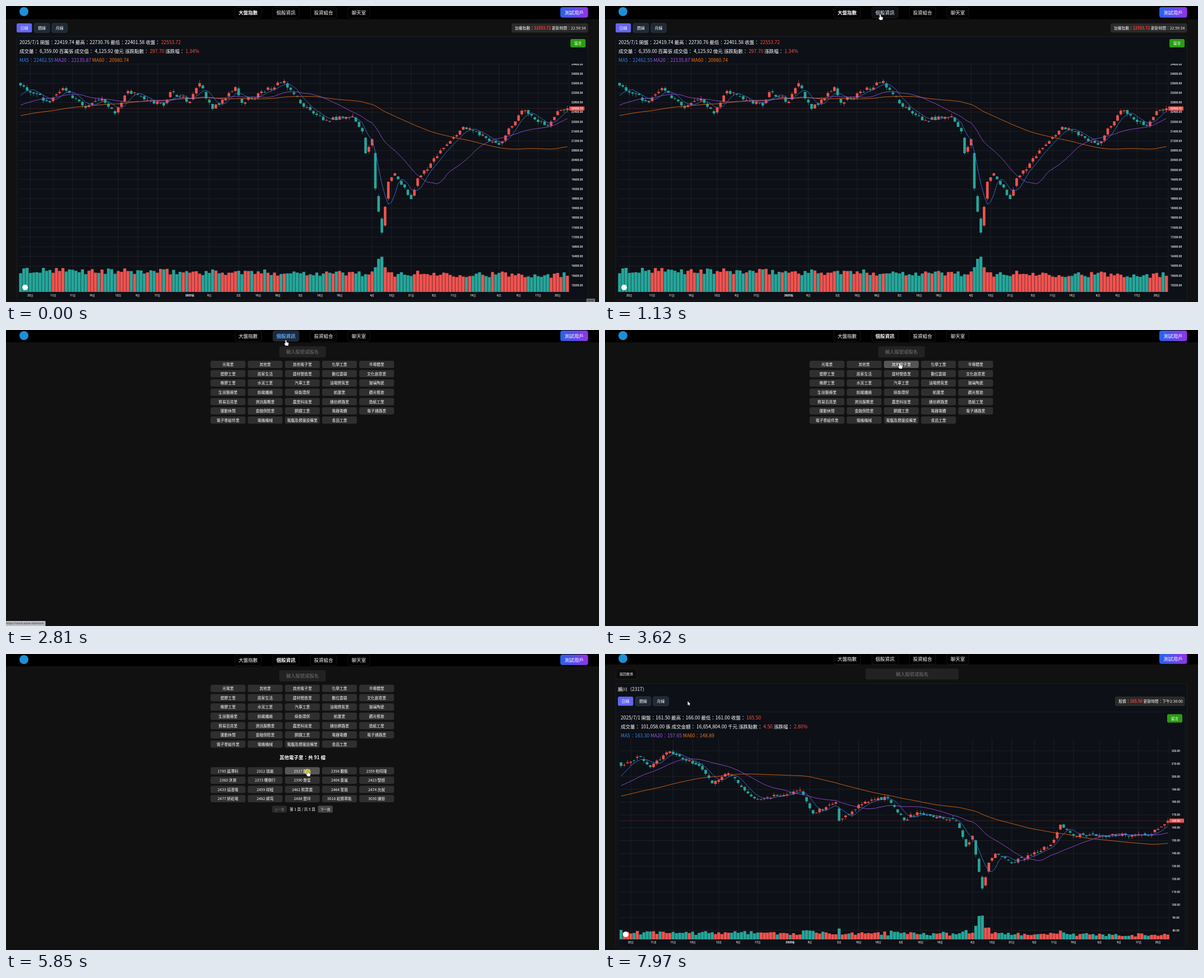
Animation, 1058 px wide and 529 px high, one loop 8000 ms. Source, as an HTML page with a canvas:

```html
<!DOCTYPE html>
<html lang="zh-Hant">
<head>
<meta charset="utf-8">
<style>
html, body { margin: 0; width: 100%; height: 100%; overflow: hidden; background: #111; }
canvas { display: block; }
</style>
</head>
<body>
<canvas id="stage" width="1058" height="529"></canvas>
<script>
const c = document.getElementById('stage').getContext('2d');
const CJK = '"Noto Sans CJK TC","Noto Sans CJK JP","Noto Sans CJK SC","Noto Sans CJK",sans-serif';
const LATIN = 'Roboto,"Noto Sans CJK TC","Noto Sans CJK JP",sans-serif';
const RED = '#ef5350', GREEN = '#26a69a', BLUE = '#3b82f6', PURPLE = '#a855f7', ORANGE = '#f97316';
const BARS = 169, STEP = 5.807, LOOP = 8000;
const rnd = n => { const v = Math.sin(n * 12.9898 + 4.1) * 43758.5453; return v - Math.floor(v); };

// ---------- drawing helpers ----------
function box(x, y, w, h, fill, r = 0, stroke) {
  c.beginPath();
  c.roundRect(x, y, w, h, r);
  if (fill) { c.fillStyle = fill; c.fill(); }
  if (stroke) { c.strokeStyle = stroke; c.lineWidth = .7; c.stroke(); }
}
function disc(x, y, r, fill) {
  c.beginPath();
  c.arc(x, y, r, 0, 7);
  c.fillStyle = fill;
  c.fill();
}
function text(s, x, y, size, color = '#fff', align = 'left', weight = 400, font = CJK) {
  c.font = `${weight} ${size}px ${font}`;
  c.textAlign = align;
  c.fillStyle = color;
  c.fillText(s, x, y + size * .37);
}
const axisText = (s, x, y, weight = 500) => text(s, x, y, 4.8, '#fff', 'center', weight, LATIN);
function runs(parts, x, y, size, weight = 400) {
  for (const [s, color, w = weight] of parts) {
    text(s, x, y, size, color, 'left', w);
    x += c.measureText(s).width;
  }
}
function line(x1, y1, x2, y2, color, dash = []) {
  c.setLineDash(dash);
  c.strokeStyle = color;
  c.lineWidth = .6;
  c.beginPath();
  c.moveTo(x1, y1);
  c.lineTo(x2, y2);
  c.stroke();
  c.setLineDash([]);
}

// ---------- charts: a price path through turning points, the rest derived ----------
// labels start at a bar and repeat every six bars
const dates = {
  3: '22日', 10: '11月 11日 19日', 30: '12月 9日 17日', 52: '2025年 9日', 67: '2月 10日 18日',
  86: '3月 10日 18日', 108: '4月 13日 21日', 127: '5月 11日 19日', 147: '6月 9日 17日 25日'
};
const indexChart = {
  x0: 26, left: 23, right: 1005, top: 104, bottom: 511, dateY: 517, labelX: 1019, mark: [34, 503],
  max: 24400, tick: 400, rows: 24, maxY: 103.8, gap: 17.18, last: 22553.72,
  seed: 0, jitter: 8, volume: 38, fade: .045, spread: 11, react: 0, crash: 32,
  turns: [[0, 142], [9, 172], [13, 147], [20, 182], [25, 166], [29, 192], [33, 152], [44, 178], [46, 154], [52, 171],
    [55, 138], [59, 184], [66, 145], [68, 173], [81, 134], [87, 180], [94, 204], [102, 197], [105, 224], [106, 263],
    [108, 238], [109, 326], [111, 405], [113, 314], [115, 299], [120, 345], [122, 308], [136, 216], [147, 248],
    [154, 187], [162, 214], [165, 188], [168, 183]]
};
const stockChart = {
  x0: 28.6, left: 26, right: 1007, top: 152, bottom: 510, dateY: 515, labelX: 1018.5, mark: [37, 501],
  max: 220, tick: 10, rows: 15, maxY: 173, gap: 22.93, last: 165.5,
  seed: 300, jitter: 6, volume: 11, fade: .02, spread: 6, react: .35, crash: 28,
  turns: [[0, 200], [6, 184], [9, 202], [15, 174], [24, 200], [28, 231], [33, 213], [41, 258], [50, 252], [55, 243],
    [59, 285], [66, 265], [67, 298], [75, 264], [82, 257], [87, 297], [91, 283], [103, 298], [106, 344], [108, 325],
    [111, 419], [113, 373], [115, 357], [120, 374], [132, 341], [135, 305], [139, 324], [162, 324], [168, 298]]
};
function prepare(ch) {
  const { turns, seed } = ch;
  ch.bars = Array.from({ length: BARS }, (_, i) => {
    const k = Math.max(1, turns.findIndex(p => p[0] >= i));
    const [[a, ya], [b, yb]] = [turns[k - 1], turns[k]];
    const noise = i === a || i === b ? 0 : ch.jitter * (rnd(i + seed) - .5);
    return { close: ya + (yb - ya) * (i - a) / (b - a) + noise };
  });
  // prices before the first bar fall away along a power curve
  const closeAt = i => i < 0 ? turns[0][1] + 17 * (-i) ** .36 : ch.bars[i].close;
  const average = (i, n) => {
    let sum = 0;
    for (let j = 0; j < n; j++) sum += closeAt(i - j);
    return sum / n;
  };
  ch.bars.forEach((bar, i) => {
    const change = closeAt(i - 1) - bar.close;
    bar.x = ch.x0 + STEP * i;
    bar.open = bar.close + (i ? change * .7 : -6) + (rnd(i + seed + 9) - .5) * 5;
    bar.volume = ch.volume - ch.fade * i + ch.spread * (rnd(i + seed + 50) - .5) +
      ch.react * Math.abs(change) + ch.crash * Math.exp(-(((i - 110.5) / 1.2) ** 2));
    for (const n of [5, 20, 60]) bar['ma' + n] = average(i, n);
  });
}
prepare(indexChart);
prepare(stockChart);

function drawAverage(bars, key, color) {
  c.strokeStyle = color;
  c.lineWidth = .8;
  c.beginPath();
  for (const bar of bars) c.lineTo(bar.x, bar[key]);
  c.stroke();
}
function drawChart(ch, cross) {
  const { left, right, top, bottom, bars } = ch;
  c.save();
  c.beginPath();
  c.rect(left - 3, top - 1, 1036 - left, 430);
  c.clip();
  for (let k = 0; k < ch.rows; k++) {
    const y = ch.maxY + k * ch.gap;
    line(left, y, right, y, '#292c32');
    axisText((ch.max - k * ch.tick).toFixed(2), ch.labelX, y);
  }
  for (const start in dates) dates[start].split(' ').forEach((label, k) => {
    const { x } = bars[+start + k * 6];
    line(x, top, x, bottom, '#292c32');
    axisText(label, x, ch.dateY, label.length > 4 ? 800 : 500);
  });
  line(right, top, right, bottom, '#1f2329');
  bars.forEach(({ x, open, close, volume }, i) => {
    const hi = Math.min(open, close), lo = Math.max(open, close), wick = 5 * rnd(i + 70);
    c.fillStyle = close <= open ? RED : GREEN;
    c.fillRect(x - 2.6, bottom - volume, 5.3, volume);
    c.fillRect(x - .35, hi - wick, .7, lo - hi + wick + 5 * rnd(i + 90));
    c.fillRect(x - 2.3, hi, 4.6, Math.max(1, lo - hi));
  });
  drawAverage(bars, 'ma60', ORANGE);
  drawAverage(bars, 'ma20', PURPLE);
  drawAverage(bars, 'ma5', BLUE);
  const lastY = ch.maxY + (ch.max - ch.last) / ch.tick * ch.gap;
  line(left, lastY, right, lastY, 'rgba(239,83,80,.75)', [.8, .8]);
  box(right, lastY - 3.6, 27, 7.2, RED, .5);
  axisText(ch.last.toFixed(2), ch.labelX, lastY);
  disc(...ch.mark, 5, '#fff');
  if (cross && cross.y > top && cross.y < bottom && cross.x < right) {
    const i = Math.round((cross.x - ch.x0) / STEP), { x } = bars[i];
    const day = new Date(2025, 6, 1 - Math.round((BARS - 1 - i) * 1.52));
    line(left, cross.y, right, cross.y, '#9598a1', [2, 2]);
    line(x, top, x, bottom, '#9598a1', [2, 2]);
    box(right, cross.y - 3.6, 25, 7.2, '#4c525e');
    axisText((ch.max - (cross.y - ch.maxY) / ch.gap * ch.tick).toFixed(2), ch.labelX, cross.y);
    box(x - 15, bottom + .5, 30, 10, '#4c525e');
    axisText(`${day.getDate()} ${day.getMonth() + 1}月 '${day.getFullYear() % 100}`, x, ch.dateY);
  }
  c.restore();
}

// ---------- pointer ----------
// start, end, steps, target; each move begins where the previous one stopped
const moves = [
  [460, 1130, 11, 491, 15],
  [1200, 1201, 1, 498.5, 16.5],
  [2810, 3360, 9, 526, 58],
  [3620, 3690, 2, 526, 60],
  [4830, 5450, 10, 538.5, 208.5],
  [6670, 7420, 12, 528.5, 107],
  [7620, 7970, 6, 147.5, 84.5]
];
const clicks = [1270, 4230, 5850];
function pointer(t) {
  if (t < moves[0][0]) return { x: -99, y: -99 };
  let x = 780, y = 420, moving = false;
  for (const [t0, t1, n, tx, ty] of moves) {
    if (t < t0) break;
    const k = Math.min(n, Math.floor((t - t0) / (t1 - t0) * (n - 1) + 1.01)) / n;
    const e = k * k * (3 - 2 * k);
    x += (tx - x) * e;
    y += (ty - y) * e;
    moving = t < t1 + 70;
  }
  return { x, y, moving };
}
const arrow = new Path2D('M0 0V7L1.6 5.6L2.7 8L3.9 7.5L2.9 5.2L5 5Z');
const hand = new Path2D('M-1 .8Q0-.8 1 .8V4L4 4.8Q5 5.2 4.8 6.5L4 10H-.6L-3 6.6Q-2.8 5.2-1 6.2Z');
let mouse, overButton;
function hover(x, y, w, h) {
  const hit = mouse.x >= x && mouse.x <= x + w && mouse.y >= y && mouse.y <= y + h;
  overButton ||= hit;
  return hit;
}
function drawPointer(t) {
  if (clicks.some(s => t >= s && t < s + 70)) disc(mouse.x - .3, mouse.y + 2, 5.2, 'rgba(232,214,30,.85)');
  c.save();
  c.translate(mouse.x, mouse.y);
  const shape = overButton ? hand : arrow;
  c.lineWidth = 1;
  c.strokeStyle = '#000';
  c.stroke(shape);
  c.fillStyle = '#fff';
  c.fill(shape);
  c.restore();
}

// ---------- pages ----------
const nav = [[408.5, 47, '大盤指數'], [476, 47, '個股資訊'], [543, 47, '投資組合'], [610, 39, '聊天室']];
function header(page) {
  const dy = [0, -1, -3][page];
  box(0, 0, 1058, [23.5, 22, 18.5][page], '#000');
  disc(32, page < 2 ? 10 : 8, 8, '#1d8fd6');
  nav.forEach(([x, w, label], i) => {
    const over = hover(x, 2 + dy, w, 20), active = i === page && page < 2;
    box(x, 2 + dy, w, 19.5, over ? (page ? '#1f2937' : '#0b0f14') : '#000', 4, '#20242b');
    text(label, x + w / 2, 12 + dy, 8.5, over && page ? '#60a5fa' : '#fff', 'center', active ? 700 : 400);
  });
  const g = c.createLinearGradient(989, 0, 1038, 0);
  g.addColorStop(0, '#2563eb');
  g.addColorStop(1, '#9333ea');
  box(989, 2 + dy, 49.5, 18.7, g, 4);
  text('測試用戶', 1013.8, 12 + dy, 8.5, '#fff', 'center', 500);
}
function periodTabs(x, y) {
  ['日線', '週線', '月線'].forEach((label, i) => {
    const bx = x + i * 31.5;
    hover(bx, y, 27.3, 16.3);
    box(bx, y, 27.3, 16.3, i ? '#1f2937' : '#6366f1', 2.5, i ? '#374151' : undefined);
    text(label, bx + 13.6, y + 8.2, 7, '#fff', 'center', 500);
  });
}
function legend(x, y, rows) {
  rows.forEach((row, i) => runs(row, x, y + i * 15.8, 8.5));
}
function averages(a, b, d) {
  return [[`MA5：${a} `, BLUE], [`MA20：${b} `, PURPLE], [`MA60：${d}`, ORANGE]];
}
function commentButton(x, y) {
  box(x, y, 27, 15, '#2a9d12', 2.5);
  text('留言', x + 13.5, y + 7.6, 6.8, '#fff', 'center');
}
function searchBox(x, y, w, h) {
  box(x, y, w, h, '#222', 3);
  text('輸入股號或股名', x + w / 2, y + h / 2, 8.3, '#737373', 'center');
}

function indexPage() {
  periodTabs(19, 31);
  box(902, 31, 136.5, 16.5, '#2a2a2a', 3);
  runs([['加權指數：', '#fff'], ['22553.72', '#ff4136', 700], [' 更新時間：22:59:34', '#fff']], 908, 39.3, 6.8, 500);
  box(19.5, 54.5, 1019, 471, '#0d1016', 4, '#20242c');
  legend(24, 65.3, [
    [['2025/7/1 開盤：22419.74 最高：22730.76 最低：22401.58 收盤： ', '#fff'], ['22553.72', '#ff5340']],
    [['成交量： 6,359.00 百萬張 成交值： 4,125.92 億元 漲跌點數： ', '#fff'], ['297.70', '#ff5340'],
      [' 漲跌幅： ', '#fff'], ['1.34%', '#ff5340']],
    averages('22462.55', '22135.87', '20980.74')]);
  commentButton(1007, 59);
  drawChart(indexChart, mouse.moving && mouse);
}

const industries = ('光電業 其他業 其他電子業 化學工業 半導體業 塑膠工業 居家生活 建材營造業 數位雲端 文化創意業 ' +
  '橡膠工業 水泥工業 汽車工業 油電燃氣業 玻璃陶瓷 生技醫療業 紡織纖維 綠能環保 航運業 觀光餐旅 ' +
  '貿易百貨業 資訊服務業 農業科技業 通信網路業 造紙工業 運動休閒 金融保險業 鋼鐵工業 電器電纜 電子通路業 ' +
  '電子零組件業 電機機械 電腦及週邊設備業 食品工業').split(' ');
const stocks = ('1785 晨澤科,2312 瑞崙,2317 鵬川,2354 鵬衡,2359 柏特隆,2360 沐棠,2373 曙嶺行,2390 霽星,2404 秦嵐,2423 堅經,' +
  '2433 協澄電,2459 祥睦,2461 熙眾霆,2464 誓築,2474 允就,2477 妍崧電,2482 綿穹,2488 楚坪,3018 崧鐫翠能,3030 謙矩').split(',');
function buttonGrid(labels, top) {
  labels.forEach((label, i) => {
    const x = 365 + i % 5 * 66.3, y = top + Math.floor(i / 5) * 16.6;
    box(x, y, 62.2, 13, hover(x, y, 62.2, 13) ? '#555' : '#2f2f2f', 3);
    text(label, x + 31.1, y + 6.7, 6.8, '#fff', 'center');
  });
}
function searchPage(t) {
  searchBox(487.5, 29, 83, 20);
  if (t >= 1940) buttonGrid(industries, 55);
  if (t >= 4500) {
    text('其他電子業：共 91 檔', 529, 185, 8.5, '#fff', 'center', 700);
    buttonGrid(stocks, 202.3);
    box(474.5, 271, 26.5, 12.5, '#292929', 2.5);
    text('上一頁', 487.8, 277.4, 5.7, '#8a8a8a', 'center');
    text('第 1 頁 / 共 5 頁', 529, 277.2, 6.7, '#fff', 'center', 500);
    box(556.5, 271, 26.5, 12.5, '#444', 2.5);
    text('下一頁', 569.8, 277.4, 5.7, '#fff', 'center');
  }
}

function loadingNote(t) {
  c.save();
  c.globalAlpha = .8 + .2 * Math.cos((t - 6060) / 1000 * Math.PI);
  text('散財中...', 517, 313.5, 10, '#facc15', 'left', 500);
  box(504.5, 314.5, 3.5, 1.4, '#eee', .7);
  box(510, 309.5, 3.5, 1.4, '#eee', .7);
  c.translate(508.8, 313.5);
  c.rotate(.75);
  box(-4.5, -2.7, 9, 5.4, '#d5d0a4', .6);
  box(-1.2, -2.7, 2.4, 5.4, '#6f7a4a');
  c.restore();
}
function stockPage(t) {
  const loaded = t >= 6740, infoX = loaded ? 910 : 913.5;
  box(19.5, 26, 37.5, 19, '#0c0c0c', 3, '#262626');
  text('返回搜尋', 38, 35.7, 6, '#fff', 'center', 500);
  searchBox(465, 26, 166, 19.5);
  box(19.5, 52.8, 1019, 475.5, '#0d1016', 4, '#20242c');
  text('鵬川（2317）', 23, 62.5, 8.4, '#fff');
  periodTabs(23, 76.3);
  box(infoX, 76, 1034.5 - infoX, 17, '#2a2a2a', 3);
  runs(loaded
    ? [['股價：', '#fff'], ['165.50', '#ff4136', 700], [' 更新時間：下午2:30:00', '#fff']]
    : [['股價： ', '#fff'], ['尚無成交', '#ff4136', 500], [' 更新時間：載入中...', '#fff']], infoX + 6.3, 84.6, 6.8, 500);
  if (!loaded) return loadingNote(t);
  box(23.3, 103.3, 1011.5, 421.5, null, 4, '#20242c');
  legend(28, 114, [
    [['2025/7/1 開盤：161.50 最高：166.00 最低：161.00 收盤： ', '#fff'], ['165.50', '#ff5340']],
    [['成交量： 101,058.00 張 成交金額： 16,654,804.00 千元 漲跌點數： ', '#fff'], ['4.50', '#ff5340'],
      [' 漲跌幅： ', '#fff'], ['2.80%', '#ff5340']],
    averages('163.30', '157.65', '148.89')]);
  commentButton(1003, 107.5);
  drawChart(stockChart, mouse.moving && mouse);
}

function frame() {
  const t = performance.now() % LOOP;
  const page = t < 1340 ? 0 : t < 6060 ? 1 : 2;
  mouse = pointer(t);
  overButton = false;
  box(0, 0, 1058, 529, '#111');
  header(page);
  [indexPage, searchPage, stockPage][page](t);
  if (t < 70) {
    box(1035.5, 523, 15.5, 6, '#6b6e73');
    text('00:00', 1043, 526.5, 4, '#222', 'center', 400, LATIN);
  }
  if (t >= 1340 && t < 2880) {
    box(0, 520, 70.5, 9, '#babdc3', 1);
    text('https://stock-pulse.site/stock', 0, 524.6, 5, '#33363b', 'left', 400, '"Noto Sans",sans-serif');
  }
  drawPointer(t);
  requestAnimationFrame(frame);
}
frame();
</script>
</body>
</html>
```
